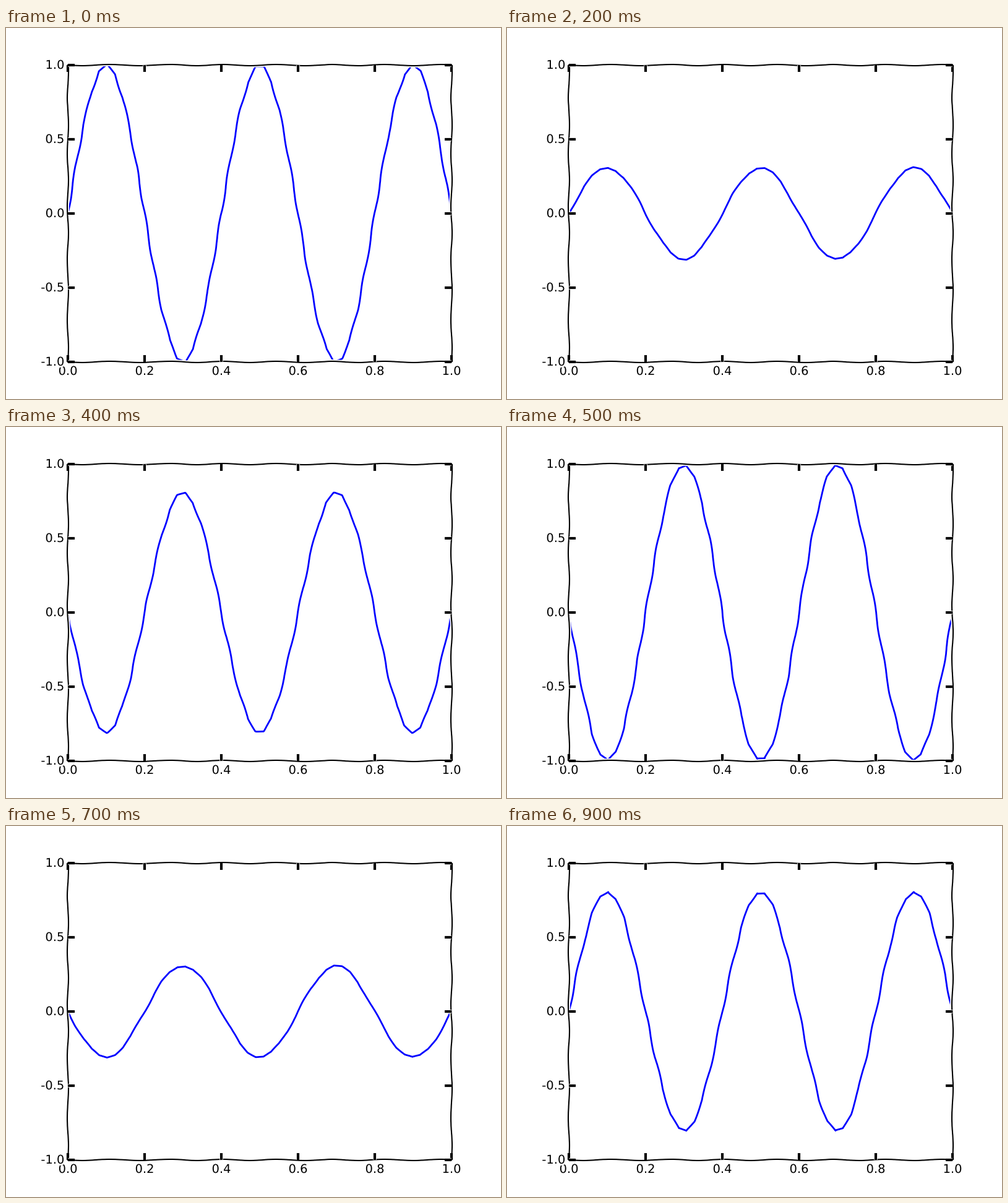
Write a matplotlib script that moves like this. It is 800 by 600 pixels and loops after 1000 ms.

```python
import numpy as np
import matplotlib.pyplot as plt
from matplotlib import patheffects
from matplotlib.animation import FuncAnimation

W, H, DPI = 800, 600, 100
FRAMES, INTERVAL = 10, 100

plt.rcParams.update({
    "path.sketch": (1, 100, 2),
    "path.effects": [patheffects.withStroke(linewidth=4, foreground="w")],
    "axes.linewidth": 1.5,
    "font.family": "DejaVu Sans",
    "font.size": 14,
})

fig = plt.figure(figsize=(W / DPI, H / DPI), dpi=DPI, facecolor="w")
ax = fig.add_axes([0.125, 0.1, 0.775, 0.8], facecolor="w")
x_ticks, y_ticks = np.linspace(0, 1, 6), np.linspace(-1, 1, 5)
ax.set(xlim=(0, 1), ylim=(-1, 1), xticks=x_ticks, yticks=y_ticks)
ax.set_axisbelow(False)
ax.tick_params(direction="in", length=8, width=3, top=True, right=True,
               labelbottom=False, labelleft=False)

# Only the frame and the wave wobble; the ticks stay straight.
for tick in ax.xaxis.get_major_ticks() + ax.yaxis.get_major_ticks():
    for mark in (tick.tick1line, tick.tick2line):
        mark.set_sketch_params(None)


def label(value, x, baseline, align):
    fig.text(x / W, 1 - baseline / H, f"{value:.1f}", ha=align, va="baseline")


for v in x_ticks:
    label(v, 100 + 620 * v, 561, "center")
for v in y_ticks:
    label(v, 94.4, 306 - 240 * v, "right")

x = np.linspace(0, 1, 50)
wave, = ax.plot([], [], color="b", lw=2)


def update(frame):
    wave.set_data(x, np.cos(2 * np.pi * frame / FRAMES) * np.sin(5 * np.pi * x))
    return wave,


anim = FuncAnimation(fig, update, frames=FRAMES, interval=INTERVAL,
                     repeat=True, repeat_delay=0)
plt.show()
```
